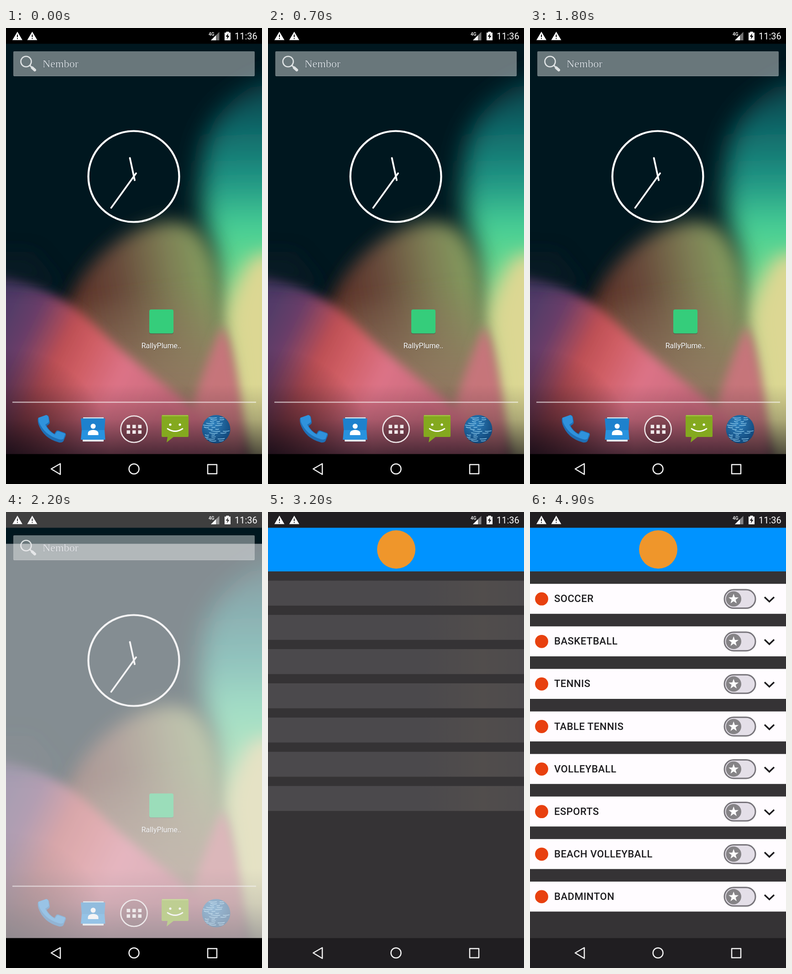
An HTML page for the animation above (5 s loop, 561 by 998 pixels).

```html
<!DOCTYPE html>
<html lang="en">
<head>
<meta charset="utf-8">
<title>App launch</title>
<style>
  html, body { margin: 0; width: 100%; height: 100%; overflow: hidden; background: #000; }
  svg { display: block; width: 100vw; height: 100vh; font-family: Roboto, Arial, sans-serif; }
</style>
</head>
<body>
<svg viewBox="0 0 561 998" preserveAspectRatio="none">
  <defs>
    <filter id="blurL" filterUnits="userSpaceOnUse" x="-150" y="-50" width="900" height="1150"><feGaussianBlur stdDeviation="27"/></filter>
    <filter id="blurM" filterUnits="userSpaceOnUse" x="-150" y="-50" width="900" height="1150"><feGaussianBlur stdDeviation="19"/></filter>
    <filter id="blurS" filterUnits="userSpaceOnUse" x="-150" y="-50" width="900" height="1150"><feGaussianBlur stdDeviation="11"/></filter>
    <linearGradient id="teal" gradientUnits="userSpaceOnUse" x1="0" y1="110" x2="0" y2="640">
      <stop offset="0" stop-color="#053a43"/><stop offset=".2" stop-color="#0f6567"/>
      <stop offset=".42" stop-color="#1f9484"/><stop offset=".62" stop-color="#48d095"/>
      <stop offset=".76" stop-color="#62d78e"/><stop offset="1" stop-color="#b8d488"/>
    </linearGradient>
    <linearGradient id="hill" gradientUnits="userSpaceOnUse" x1="150" y1="560" x2="480" y2="500">
      <stop offset="0" stop-color="#5c3026"/><stop offset=".3" stop-color="#684a3b"/>
      <stop offset=".65" stop-color="#7f8156"/><stop offset="1" stop-color="#84aa62"/>
    </linearGradient>
    <linearGradient id="hillLow" x1="0" y1="0" x2="0" y2="1">
      <stop offset="0" stop-color="#917a61" stop-opacity="0"/><stop offset=".55" stop-color="#917a61" stop-opacity=".85"/>
      <stop offset="1" stop-color="#957062"/>
    </linearGradient>
    <linearGradient id="pink" gradientUnits="userSpaceOnUse" x1="0" y1="620" x2="358" y2="799">
      <stop offset="0" stop-color="#513b68"/><stop offset=".16" stop-color="#6a3e68"/>
      <stop offset=".36" stop-color="#bd4f54"/><stop offset=".5" stop-color="#cf5d63"/>
      <stop offset=".72" stop-color="#dc7387"/><stop offset="1" stop-color="#ca6b7d"/>
    </linearGradient>
    <linearGradient id="shade" x1="0" y1="0" x2="0" y2="1">
      <stop offset="0" stop-color="#0a0812" stop-opacity="0"/><stop offset=".5" stop-color="#0a0812" stop-opacity=".22"/>
      <stop offset="1" stop-color="#0a0812" stop-opacity=".66"/>
    </linearGradient>
    <radialGradient id="corner" gradientUnits="userSpaceOnUse" cx="0" cy="930" r="230">
      <stop offset="0" stop-color="#0c0a18" stop-opacity=".65"/><stop offset="1" stop-color="#0c0a18" stop-opacity="0"/>
    </radialGradient>
    <radialGradient id="globe" cx=".4" cy=".3" r=".75">
      <stop offset="0" stop-color="#2d80bd"/><stop offset="1" stop-color="#0f4375"/>
    </radialGradient>
    <linearGradient id="shine" gradientUnits="userSpaceOnUse" x1="-130" y1="0" x2="130" y2="0">
      <stop offset="0" stop-color="#4b494c"/><stop offset=".5" stop-color="#514d4c"/><stop offset="1" stop-color="#4b494c"/>
    </linearGradient>
    <clipPath id="disc"><circle cx="460.5" cy="878" r="30"/></clipPath>
  </defs>

  <g id="home">
    <rect width="561" height="998" fill="#00171f"/>
    <path d="M640 90 Q470 130 435 260 Q415 400 455 480 L470 900 H640Z" fill="url(#teal)" filter="url(#blurL)"/>
    <path d="M120 630 C165 520 250 438 350 425 C410 420 440 450 462 530 L505 900 H240Z" fill="url(#hill)" filter="url(#blurM)"/>
    <path d="M150 610 L455 560 L500 900 H240Z" fill="url(#hillLow)" filter="url(#blurM)"/>
    <path d="M600 490 L540 500 Q495 570 490 640 Q510 790 525 980 H600Z" fill="#dcd793" filter="url(#blurM)"/>
    <path d="M473 650 Q435 740 405 840 L400 980 H532 Q520 800 490 690Z" fill="#c6757a" filter="url(#blurS)"/>
    <path d="M-60 535 C60 545 140 595 205 660 C270 725 345 775 430 850 L470 1000 H-60Z" fill="url(#pink)" filter="url(#blurS)"/>
    <path d="M-60 490 H60 L130 575 Q60 555 -60 560Z" fill="#0a1a28" opacity=".55" filter="url(#blurM)"/>
    <rect y="690" width="240" height="243" fill="url(#corner)"/>
    <rect y="780" width="561" height="153" fill="url(#shade)"/>

    <rect x="16" y="51" width="529" height="54.500" rx="2" fill="#fff" fill-opacity=".41"/>
    <path d="M17 104.500H544" stroke="#fff" stroke-opacity=".2"/>
    <g fill="none" stroke="#dfe3e4" stroke-linecap="round">
      <circle cx="44" cy="73.500" r="11.500" stroke-width="2.600"/>
      <path d="M52.500 82L56 85.500" stroke-width="3"/><path d="M57.500 87L63 92" stroke-width="6"/>
    </g>
    <text x="80" y="86" font-family="Liberation Serif, Times, serif" font-size="24" fill="#d5dcdf" stroke="#43515a" stroke-width="1.200" paint-order="stroke">Nembor</text>

    <g fill="none" stroke="#fff" stroke-linecap="round">
      <circle cx="280" cy="325" r="99.500" stroke-width="4.200"/>
      <path d="M271.500 284.500L282 333M285 318L230.500 393.500" stroke-width="3.800"/>
    </g>

    <rect x="314" y="617" width="53" height="53" rx="4" fill="#123" opacity=".3"/>
    <rect x="314" y="616" width="53" height="52.500" rx="4" fill="#35cd7b"/>
    <g font-size="16" text-anchor="middle">
      <text x="341" y="702" fill="#000" opacity=".4">RallyPlume..</text>
      <text x="340.500" y="701" fill="#fff">RallyPlume..</text>
    </g>

    <path d="M14 819H548" stroke="#fff" stroke-opacity=".6" stroke-width="2.400"/>

    <path d="M70 854L89 847Q93 848 94 852L96 863Q96 866 93 868L89 871Q95 882 106 888L110 882Q112 880 115 881L129 886Q132 888 131 892L126 904Q123 908 116 907Q82 898 71 867Q69 859 70 854Z" fill="#1f6fb5"/>
    <path d="M71 853L88 847Q92 848 93 852L94 861Q94 863 91 865L86 868Q93 883 107 890L111 884Q113 882 116 883L130 888L126 899Q122 902 116 900Q84 891 72 862Z" fill="#2f92dc"/>

    <g>
      <rect x="169" y="852" width="45" height="8" fill="#d6e2ea"/>
      <rect x="168" y="893" width="46" height="12" rx="1" fill="#e3e9ed"/>
      <path d="M164 854.500H217.500L216 880H166Z" fill="#1d81cd"/>
      <path d="M166 880H216L217.500 901H164Z" fill="#2792df"/>
      <circle cx="191" cy="871.500" r="5.500" fill="#fff"/>
      <path d="M179.500 891V887Q180 880 191 879.500Q202 880 202.500 887V891Z" fill="#fff"/>
    </g>

    <circle cx="280.500" cy="878" r="29" fill="#000" fill-opacity=".18" stroke="#eee6e8" stroke-width="2.600"/>
    <g id="dots" fill="#f0e9ea"></g>

    <path d="M343 847H398Q400 847 400 849V893Q400 895 398 895H367L352 907L354 895H343Q341 895 341 893V849Q341 847 343 847Z" fill="#84a91f"/>
    <path d="M342 848.500H399" stroke="#a9c84c" stroke-width="2"/>
    <g fill="#fff"><circle cx="360" cy="868" r="2.600"/><circle cx="381" cy="868" r="2.600"/></g>
    <path d="M354 877Q370.500 888 387 877" fill="none" stroke="#fff" stroke-width="2.800" stroke-linecap="round"/>

    <circle cx="460.500" cy="878" r="31" fill="url(#globe)"/>
    <g id="bands" clip-path="url(#disc)" fill="none" stroke="#86c3e6" stroke-width="1.500"></g>
  </g>

  <g id="splash"><rect y="34" width="561" height="1000" fill="#edebee"/></g>

  <g id="app">
    <rect width="561" height="998" fill="#353335"/>
    <rect y="34" width="561" height="96" fill="#0093ff"/>
    <circle cx="281" cy="82" r="42" fill="#ef962b"/>
    <g id="skeleton"></g>
    <g id="list"></g>
  </g>

  <rect id="navBg" y="932.500" width="561" height="66"/>
  <rect id="statusBg" width="561" height="34.500"/>
  <g fill="none" stroke="#f2f2f2" stroke-width="2.500" stroke-linejoin="round">
    <path d="M99 965L119 953.500V977Z"/><circle cx="280.500" cy="965" r="11"/><rect x="442" y="955.500" width="20" height="20"/>
  </g>
  <g id="status" fill="#fff">
    <g id="alerts"></g>
    <text x="444" y="17" font-size="10" font-weight="500">4G</text>
    <path d="M449 27H467.500V8.500Z" fill-opacity=".45"/><path d="M449 27H460V16Z"/>
    <path d="M479 10H482.500V8H488.500V10H492V27H479Z"/>
    <path id="bolt" d="M487 11.500L481.500 19H485L484 25L489.500 17H486Z"/>
    <text x="501" y="25" font-size="20">11:36</text>
  </g>
</svg>
<script>
const LOOP = 5000, STEP = 100;
const LAUNCH = 2200, OPENED = 2400, READY = 2900, LOADED = 3500;
const sports = ["SOCCER", "BASKETBALL", "TENNIS", "TABLE TENNIS", "VOLLEYBALL", "ESPORTS", "BEACH VOLLEYBALL", "BADMINTON"];
const el = id => document.getElementById(id);
const repeat = (n, fn) => Array.from({ length: n }, (_, i) => fn(i)).join("");

function star(cx, cy, r) {
  return Array.from({ length: 10 }, (_, i) => {
    const a = Math.PI * (i / 5 - 0.5), d = i % 2 ? r * 0.4 : r;
    return (cx + d * Math.cos(a)).toFixed(2) + "," + (cy + d * Math.sin(a)).toFixed(2);
  }).join(" ");
}

function row(i) {
  return `<g transform="translate(0 ${157.2 + i * 93.1})">
    <rect width="561" height="65.6" fill="#fffcff"/>
    <circle cx="25.5" cy="33" r="14.4" fill="#e8400f"/>
    <text x="53" y="40" font-size="22" font-weight="500" letter-spacing=".5" fill="#1c1b1e">${sports[i]}</text>
    <rect x="426" y="12.800" width="68" height="40.600" rx="20.300" fill="#e4dfe8" stroke="#77747a" stroke-width="3"/>
    <circle cx="446.200" cy="33" r="16.800" fill="#858386"/>
    <polygon points="${star(446.2, 33.4, 11.6)}" fill="#fff"/>
    <path d="M514 29L524.500 39L535 29" fill="none" stroke="#1c1b1e" stroke-width="3.500"/>
  </g>`;
}

el("dots").innerHTML = repeat(6, i =>
  `<rect x="${264.5 + i % 3 * 12.5}" y="${868.5 + (i > 2) * 12}" width="7.500" height="7.500"/>`);
el("bands").innerHTML = repeat(13, i => {
  const y = 852 + i * 4.2, x = 440 + 9 * Math.sin(i * 1.1), w = 15 + 7 * Math.cos(i * 1.7);
  return `<path d="M${x} ${y}q${w / 2} 3 ${w} 1M${x + w + 6} ${y + 1}q8 1 ${w * 0.7} -1"/>`;
});
el("alerts").innerHTML = repeat(2, i =>
  `<g transform="translate(${25 + i * 32.5} 0)"><path d="M-11 26.500L0 8L11 26.500Z"/>
   <path class="cut" d="M-1 14.500H1V20H-1ZM-1 22H1V24H-1Z"/></g>`);
el("skeleton").innerHTML = repeat(7, i =>
  `<rect y="${150.3 + i * 74.9}" width="561" height="54.600" fill="url(#shine)"/>`);
el("list").innerHTML = repeat(sports.length, row);

const cuts = [el("bolt"), ...document.querySelectorAll(".cut")];
const show = (id, on) => { el(id).style.display = on ? "" : "none"; };

function draw(time) {
  const t = Math.floor(time / STEP) * STEP;
  const inApp = t >= READY;
  const open = Math.min(1, Math.max(0, (t - LAUNCH + STEP) / (OPENED - LAUNCH + STEP)));
  const ease = 1 - (1 - open) ** 2;
  show("home", ease < 1);
  show("splash", open > 0 && !inApp);
  show("app", inApp);
  show("skeleton", t < LOADED);
  show("list", t >= LOADED);
  el("splash").setAttribute("opacity", ease);
  el("splash").setAttribute("transform", `translate(0 ${80 * (1 - ease)})`);
  const grey = Math.round(114 * ease);
  const bar = inApp ? "#201e21" : `rgb(${grey},${grey},${grey})`;
  el("statusBg").setAttribute("fill", bar);
  el("navBg").setAttribute("fill", inApp ? "#201e21" : "#000");
  cuts.forEach(c => c.setAttribute("fill", bar));
  const x = (470 + (t - 3200) * 0.8 + 130 + 1640) % 820 - 130;
  el("shine").setAttribute("gradientTransform", `translate(${x} 0)`);
}

const start = performance.now();
function tick() {
  draw((performance.now() - start) % LOOP);
  requestAnimationFrame(tick);
}
tick();
</script>
</body>
</html>
```
